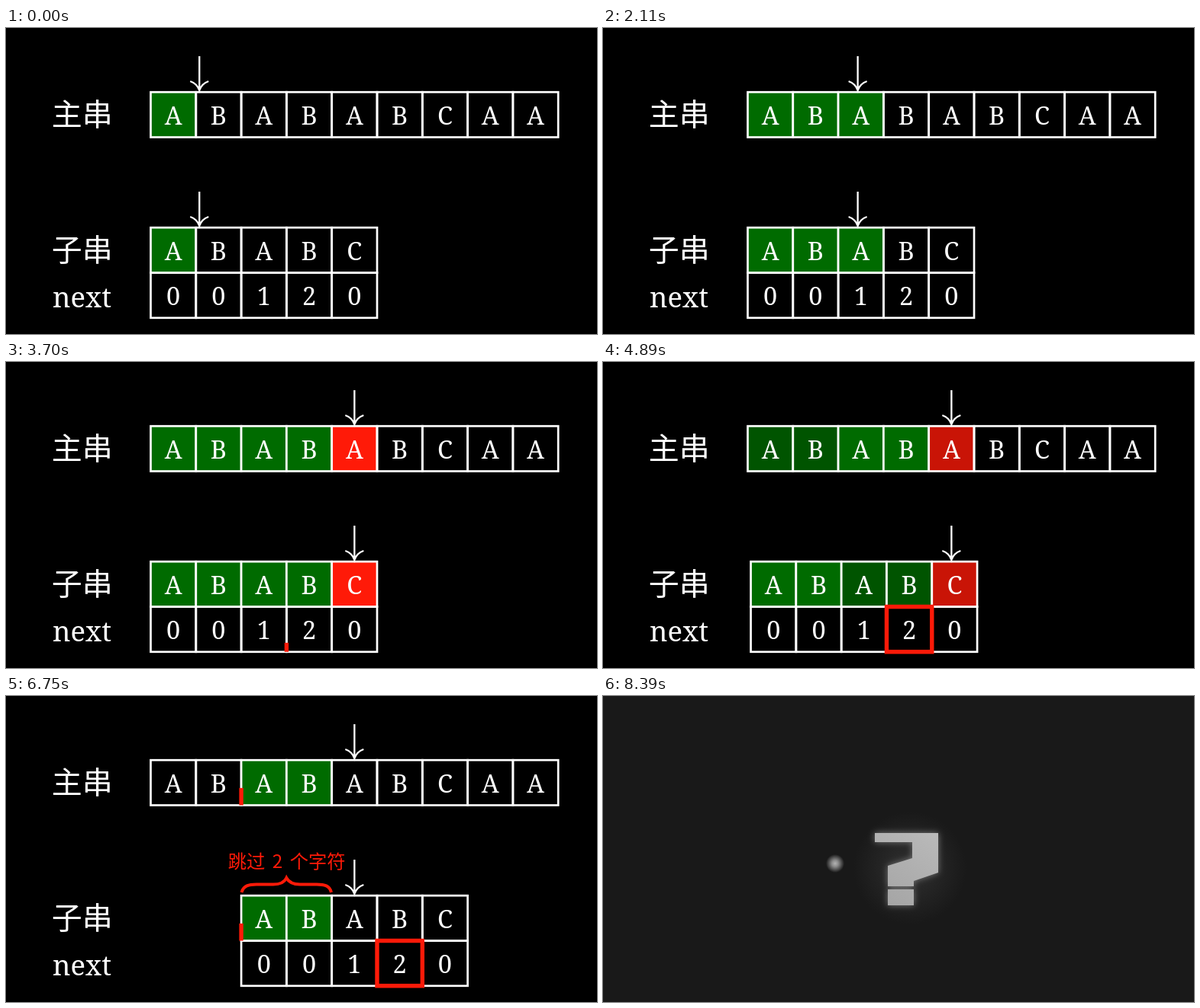
Recreate the animation shown at these times as an HTML page with a canvas. Size 774 by 402 pixels, loop 8.49 s.

```html
<!DOCTYPE html>
<html lang="zh">
<head>
<meta charset="utf-8">
<style>
html, body { margin: 0; width: 100%; height: 100%; overflow: hidden; background: #000; }
canvas { display: block; }
</style>
</head>
<body>
<canvas width="774" height="402"></canvas>
<script>
const ctx = document.querySelector('canvas').getContext('2d');
const LOOP = 8490, CELL = 59.3, LEFT = 189.5;
const MAIN_Y = 84.2, SUB_Y = 262.2, NEXT_Y = SUB_Y + CELL;
const RED = '#ff1a08', GREEN = '#006b00', WHITE = '#fff';
const CJK = '"Noto Sans CJK SC", "Noto Sans CJK", sans-serif';
const SERIF = '"Noto Serif", serif';

const span = (t, start, end) => Math.min(1, Math.max(0, (t - start) / (end - start)));
const sigmoid = x => 1 / (1 + Math.exp(-x));
const smooth = p => {
  const edge = sigmoid(-5);
  return (sigmoid(10 * (p - 0.5)) - edge) / (1 - 2 * edge);
};

function text(str, x, y, font, color = WHITE, align = 'center', word = 0) {
  ctx.font = font;
  ctx.fillStyle = color;
  ctx.textAlign = align;
  ctx.wordSpacing = word + 'px';
  ctx.fillText(str, x, y);
}

function stroke(path, color, width) {
  ctx.strokeStyle = color;
  ctx.lineWidth = width;
  ctx.stroke(new Path2D(path));
}

function row(chars, x, y, fillAlpha = () => 0) {
  [...chars].forEach((ch, i) => {
    const left = x + i * CELL;
    ctx.globalAlpha = fillAlpha(i);
    ctx.fillStyle = i === 4 ? RED : GREEN;
    ctx.fillRect(left, y, CELL, CELL);
    ctx.globalAlpha = 1;
    ctx.strokeStyle = WHITE;
    ctx.lineWidth = 2.7;
    ctx.strokeRect(left, y, CELL, CELL);
    text(ch, left + CELL / 2, y + 42.3, '32.5px ' + SERIF);
  });
}

// Outline drawn clockwise from the bottom left corner.
function outline(x, y, cells, progress) {
  if (!progress) return;
  const w = cells * CELL, length = 2 * (w + CELL);
  if (progress < 1) ctx.setLineDash([length * progress, length]);
  stroke(`M${x} ${y + CELL}v${-CELL}h${w}v${CELL}z`, RED, 5.4);
  ctx.setLineDash([]);
}

function arrow(x, tip) {
  ctx.save();
  ctx.translate(x, tip);
  stroke('M0 -45V-1M-12 -12Q-3 -9 0 0Q3 -9 12 -12', WHITE, 2.3);
  ctx.restore();
}

function skipNote(alpha) {
  if (!alpha) return;
  ctx.globalAlpha = alpha;
  text('跳过 2 个字符', 367.7, 226, '500 24.3px ' + CJK, RED, 'center', 4);
  stroke('M308.5 258C311 249 318 247.5 328 247.5H350C360 247.5 365 244 367.3 239' +
    'C370 244 375 247.5 385 247.5H407C417 247.5 424 249 426 258', RED, 4);
  ctx.globalAlpha = 1;
}

function matching(t) {
  const step = Math.min(4, 0.53 + Math.max(0, t - 1470) / 525);
  const done = Math.floor(step);
  const arrowX = LEFT + CELL * (0.5 + done + smooth(step - done));
  const filled = i => i > 4 ? 0 : span(step, i - 0.45, i - 0.28);
  const keep = 1 - span(t, 4695, 5620);
  const subX = LEFT + 2 * CELL * smooth(span(t, 4699, 5745));
  const groups = smooth(span(t, 6520, 7480));

  text('主串', 59.7, 128, '500 40px ' + CJK, WHITE, 'left');
  text('子串', 59.7, 306, '500 40px ' + CJK, WHITE, 'left');
  text('next', 61, 366.5, '36.5px ' + SERIF, WHITE, 'left');

  row('ABABABCAA', LEFT, MAIN_Y, i => filled(i) * (i === 2 || i === 3 ? 1 : keep));
  row('ABABC', subX, SUB_Y, i => filled(i) * (i < 2 ? 1 : keep));
  row('00120', subX, NEXT_Y);

  outline(subX + 3 * CELL, NEXT_Y, 1, smooth(span(t, 3491, 4451)));
  skipNote(smooth(span(t, 5740, 6480)));
  outline(LEFT + 2 * CELL, MAIN_Y, 2, groups);
  outline(subX, SUB_Y, 2, groups);
  arrow(arrowX, 82);
  arrow(arrowX, 260);

  ctx.fillStyle = `rgba(0, 0, 0, ${span(t, 7450, 8090)})`;
  ctx.fillRect(0, 0, 774, 402);
}

function glow(x, y, radius, color, alpha) {
  const g = ctx.createRadialGradient(x, y, 0, x, y, radius);
  g.addColorStop(0, `rgba(${color}, ${alpha})`);
  g.addColorStop(0.35, `rgba(${color}, ${alpha * 0.75})`);
  g.addColorStop(1, `rgba(${color}, 0)`);
  ctx.fillStyle = g;
  ctx.fillRect(x - radius, y - radius, 2 * radius, 2 * radius);
}

function question(t) {
  ctx.fillStyle = '#191919';
  ctx.fillRect(0, 0, 774, 402);
  ctx.globalAlpha = span(t, 8270, 8390);
  glow(402, 226, 74, '65, 65, 65', 0.5);
  glow(304, 220, 12, '195, 195, 195', 0.9);
  const shade = ctx.createLinearGradient(373, 275, 439, 180);
  shade.addColorStop(0, '#a5a5a5');
  shade.addColorStop(1, '#bababa');
  ctx.fillStyle = shade;
  ctx.shadowColor = '#777';
  ctx.shadowBlur = 8;
  ctx.fill(new Path2D('M356 180H439V232L407 243V250H373V223L405 213V192H356zM373 254H407V275H373z'));
  ctx.shadowBlur = 0;
  ctx.globalAlpha = 1;
}

function draw() {
  const t = performance.now() % LOOP;
  ctx.fillStyle = '#000';
  ctx.fillRect(0, 0, 774, 402);
  if (t < 8200) matching(t);
  else question(t);
  requestAnimationFrame(draw);
}
draw();
</script>
</body>
</html>
```
